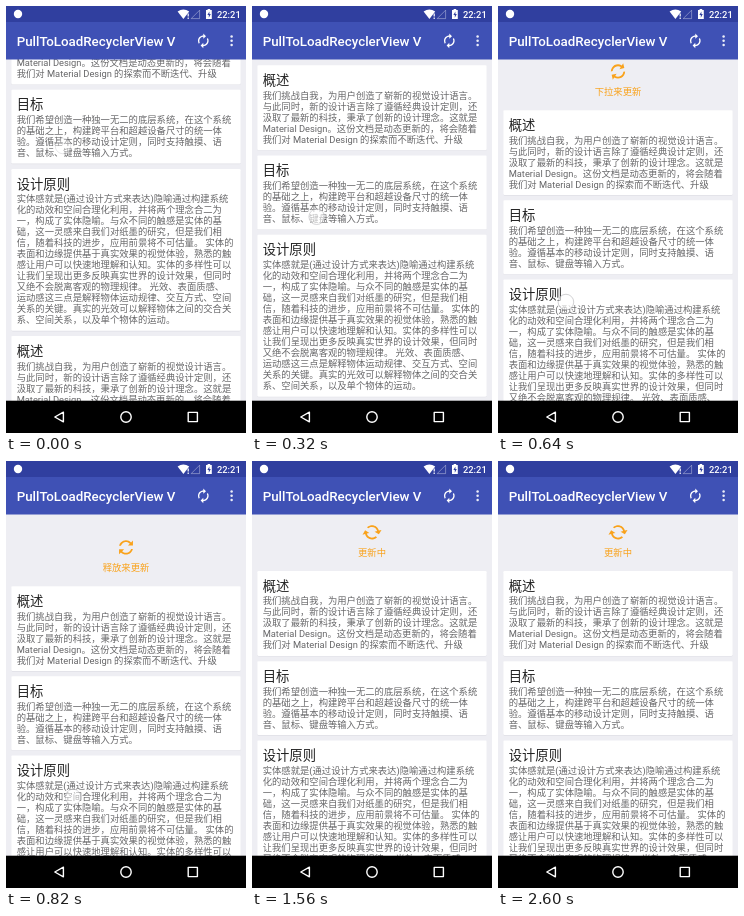
Write an HTML page that moves like this. It is 240x427 px and loops after 2.62 s.

```html
<!DOCTYPE html>
<html lang="zh-CN">
<head>
<meta charset="utf-8">
<title>Pull to refresh</title>
<style>
  html, body { margin: 0; width: 100%; height: 100%; overflow: hidden; background: #000; }
  svg { display: block; width: 240px; height: 427px; }
  text {
    font-family: Roboto, "Noto Sans CJK SC", "Noto Sans CJK", sans-serif;
    white-space: pre;
    text-spacing-trim: space-all;
  }
  .body { font-size: 9.333px; fill: #676769; }
  .head { font-size: 13.333px; fill: #222; }
  .hint { font-size: 9.333px; fill: #f9a21b; text-anchor: middle; }
  .bar { font-size: 13.333px; font-weight: 500; fill: #fff; }
  .clock { font-size: 9.333px; font-weight: 500; fill: #fff; text-anchor: end; }
</style>
</head>
<body>
<svg viewBox="0 0 240 427" xmlns="http://www.w3.org/2000/svg">
  <defs>
    <path id="renew" d="M12 6v3l4-4-4-4v3c-4.42 0-8 3.58-8 8 0 1.57.46 3.03 1.24 4.26L6.7 14.8c-.45-.83-.7-1.79-.7-2.8 0-3.31 2.69-6 6-6zm6.76 1.74L17.3 9.2c.44.84.7 1.79.7 2.8 0 3.31-2.69 6-6 6v-3l-4 4 4 4v-3c4.42 0 8-3.58 8-8 0-1.57-.46-3.03-1.24-4.26z" transform="translate(-12 -12)"/>
  </defs>
  <rect width="240" height="427" fill="#eeeef3"/>

  <g id="list">
    <g transform="translate(120 -53.7) scale(.889)"><use id="spin" href="#renew" fill="#f9a21b"/></g>
    <text id="hint" class="hint" x="120" y="-29.8"></text>
  </g>

  <g id="touch">
    <circle r="7.8" fill="#fff" fill-opacity=".8" stroke="#b4b4b8" stroke-width=".8"/>
  </g>

  <!-- toolbar -->
  <rect y="16" width="240" height="37.5" fill="#3f51b5"/>
  <text class="bar" x="10.67" y="39.9">PullToLoadRecyclerView V</text>
  <use href="#renew" fill="#fff" transform="translate(197.3 34.8) scale(.667)"/>
  <g fill="#fff" fill-opacity=".9">
    <circle cx="225.6" cy="30.6" r="1.25"/>
    <circle cx="225.6" cy="34.8" r="1.25"/>
    <circle cx="225.6" cy="39" r="1.25"/>
  </g>

  <!-- status bar -->
  <rect width="240" height="16" fill="#303f9f"/>
  <circle cx="12" cy="8" r="4.2" fill="#fff"/>
  <path d="M171.6 5.6Q177.4 1.6 183.2 5.6L177.4 13z" fill="#fff"/>
  <path d="M182.2 7.6v3M182.2 11.6v1.4" stroke="#fff" stroke-width="1.2"/>
  <path d="M193.6 4.2v8.4h-8.4z" fill="none" stroke="#fff" stroke-opacity=".45" stroke-width=".8"/>
  <path d="M200 4h1.6V2.9h2.6V4h1.6v9H200z" fill="#fff"/>
  <path d="M203.4 5.4l-2 3.6h1.4v2.7l2-3.7h-1.4z" fill="#303f9f"/>
  <text class="clock" x="234.7" y="11.6">22:21</text>

  <!-- navigation bar -->
  <rect y="394.7" width="240" height="32.3" fill="#000"/>
  <g fill="none" stroke="#fff" stroke-width="1.4" stroke-linejoin="round">
    <path d="M48.8 411L57.4 406.2V415.8z"/>
    <circle cx="120" cy="411" r="5.2"/>
    <rect x="182.2" y="406.4" width="9.2" height="9.2"/>
  </g>
</svg>

<script>
const LOOP = 2620, RELEASE = 1190, REST = 125;
const LINE = 11;

const overview = ['概述',
  '我们挑战自我，为用户创造了崭新的视觉设计语言。',
  '与此同时，新的设计语言除了遵循经典设计定则，还',
  '汲取了最新的科技，秉承了创新的设计理念。这就是',
  'Material Design。这份文档是动态更新的，将会随着',
  '我们对 Material Design 的探索而不断迭代、升级'];
const goals = ['目标',
  '我们希望创造一种独一无二的底层系统，在这个系统',
  '的基础之上，构建跨平台和超越设备尺寸的统一体',
  '验。遵循基本的移动设计定则，同时支持触摸、语',
  '音、鼠标、键盘等输入方式。'];
const principles = ['设计原则',
  '实体感就是(通过设计方式来表达)隐喻通过构建系统',
  '化的动效和空间合理化利用，并将两个理念合二为',
  '一，构成了实体隐喻。与众不同的触感是实体的基',
  '础，这一灵感来自我们对纸墨的研究，但是我们相',
  '信，随着科技的进步，应用前景将不可估量。 实体的',
  '表面和边缘提供基于真实效果的视觉体验，熟悉的触',
  '感让用户可以快速地理解和认知。实体的多样性可以',
  '让我们呈现出更多反映真实世界的设计效果，但同时',
  '又绝不会脱离客观的物理规律。 光效、表面质感、',
  '运动感这三点是解释物体运动规律、交互方式、空间',
  '关系的关键。真实的光效可以解释物体之间的交合关',
  '系、空间关系，以及单个物体的运动。'];

const $ = id => document.getElementById(id);
const list = $('list'), spin = $('spin'), hint = $('hint'), touch = $('touch');

function add(tag, attrs, text = '') {
  const el = document.createElementNS('http://www.w3.org/2000/svg', tag);
  for (const k in attrs) el.setAttribute(k, attrs[k]);
  el.textContent = text;
  list.appendChild(el);
}

// The list origin is the middle of the first card's title.
let y = 0;
for (const [title, ...lines] of [overview, goals, principles, overview]) {
  const pitch = 35.2 + LINE * lines.length;
  const box = { x: 5.3, width: 229.4, height: pitch - 5.3, rx: 1.3 };
  add('rect', { ...box, y: y - 14.4, fill: '#e0e0e6' });
  add('rect', { ...box, y: y - 15, fill: '#fff' });
  add('text', { class: 'head', x: 10.67, y: y + 4.6 }, title);
  lines.forEach((s, i) => add('text', { class: 'body', x: 10.67, y: y + 18.4 + LINE * i }, s));
  y += pitch;
}

// time, x, y, opacity of the finger
const finger = [
  [0, 57, 140, .4], [180, 61, 172, .55], [480, 69, 255, .9],
  [780, 67, 332, .65], [820, 67, 336, .6], [1190, 69, 340, .3], [1260, 69, 340, 0]
];

function fingerAt(t) {
  const i = finger.findIndex(k => k[0] > t);
  if (i < 0) return finger[finger.length - 1];
  const a = finger[i - 1], b = finger[i], p = (t - a[0]) / (b[0] - a[0]);
  return a.map((v, n) => v + (b[n] - v) * p);
}

// Scrolls one to one up to the list's top, then drags at half speed.
const TOP = 69;
function pulled(fy) {
  const free = fy - 131.5;
  return free < TOP ? free : TOP + (free - TOP) * .525;
}

function draw(t) {
  const [, fx, fy, alpha] = fingerAt(t);
  const drag = pulled(fy);
  const back = Math.min(1, Math.max(0, (t - RELEASE) / 310));
  const pos = drag + (REST - drag) * (1 - Math.cos(Math.PI * back)) / 2;
  const busy = t >= RELEASE;
  const angle = busy ? (t - RELEASE) * 360 / 520 : Math.max(0, pos - TOP) * .64;

  list.setAttribute('transform', `translate(0 ${pos.toFixed(2)})`);
  spin.setAttribute('transform', `rotate(${angle.toFixed(1)})`);
  hint.textContent = busy ? '更新中' : pos > REST ? '释放来更新' : '下拉来更新';
  touch.setAttribute('transform', `translate(${fx.toFixed(2)} ${fy.toFixed(2)})`);
  touch.setAttribute('opacity', alpha.toFixed(2));
}

const start = performance.now();
function tick() {
  const t = (performance.now() - start) % LOOP;
  draw(Math.floor(t / 20) * 20);
  requestAnimationFrame(tick);
}
tick();
</script>
</body>
</html>
```
